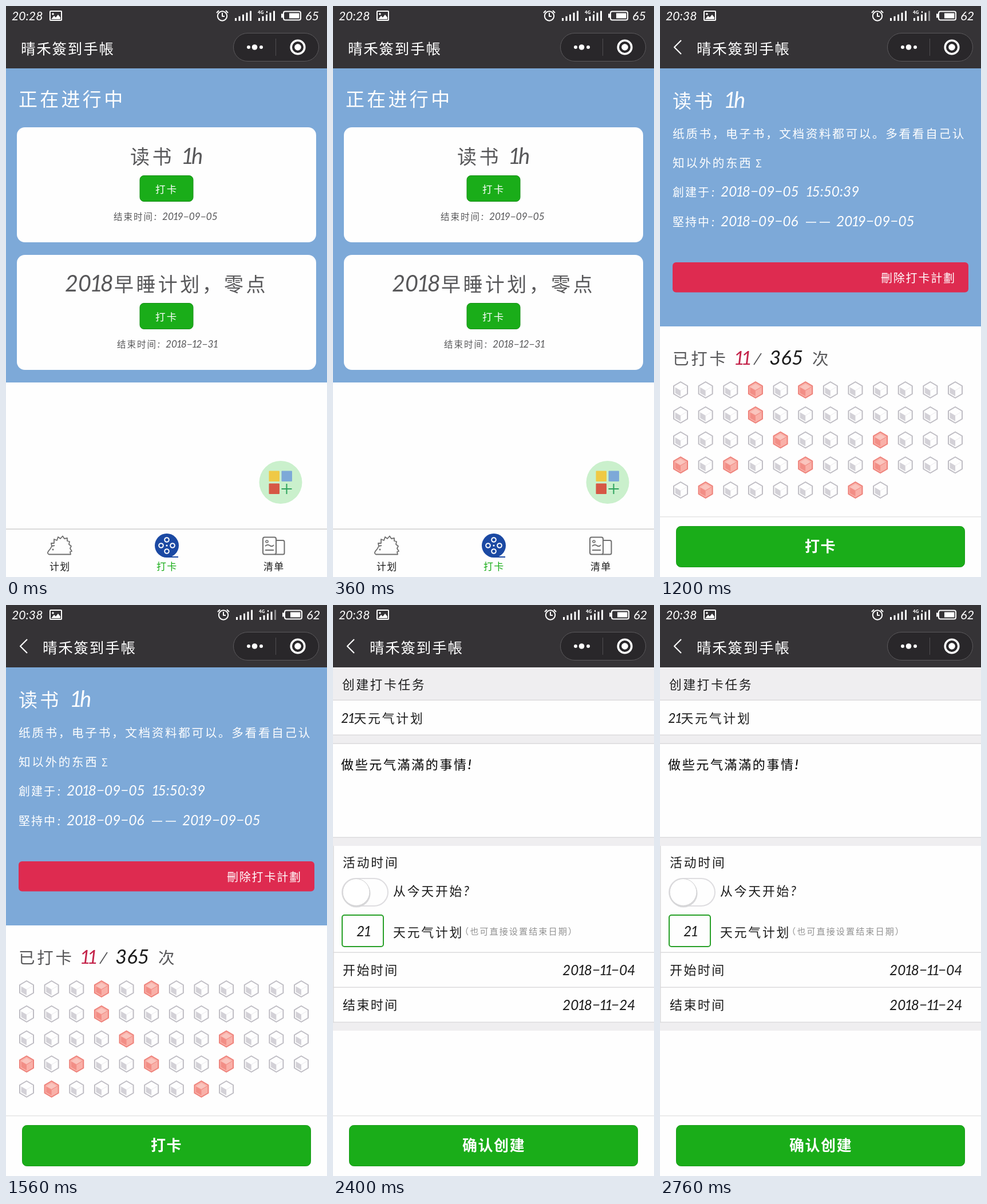
These frames come from a looping animation (561 px wide and 998 px high, 3000 ms). An HTML page:

```html
<!DOCTYPE html>
<html lang="zh">
<head>
<meta charset="utf-8">
<title>签到</title>
<style>
  html, body { margin: 0; width: 100%; height: 100%; overflow: hidden; background: #fefefe; }
  svg { display: block; position: absolute; left: 0; top: 0; }
  text { font-family: "Noto Sans CJK SC", "Noto Sans CJK", sans-serif; white-space: pre; }
  .latin { font-family: Lato, "Noto Sans", sans-serif; font-style: italic; letter-spacing: 0; }
</style>
</head>
<body>
<svg id="stage" width="561" height="998" viewBox="0 0 561 998"></svg>
<script>
const STEP = 600;
const C = {
  dark: '#353336', blue: '#7da9d8', yellow: '#efcd48', green: '#1aad19', pale: '#9dd99c',
  paleText: '#d6f0d5', red: '#de2b50', crimson: '#c4244a', gray: '#58585a', icon: '#6f6f6f',
  ink: '#1c1c1c', band: '#efeef0', rule: '#dcdbdd', white: '#fefefe'
};
const APP = '晴禾簽到手帳';

const rect = (x, y, w, h, fill, r = 0, stroke = 'none', sw = 1) =>
  `<rect x="${x}" y="${y}" width="${w}" height="${h}" rx="${r}" fill="${fill}" stroke="${stroke}" stroke-width="${sw}"/>`;
const circle = (x, y, r, fill, stroke = 'none', sw = 1) =>
  `<circle cx="${x}" cy="${y}" r="${r}" fill="${fill}" stroke="${stroke}" stroke-width="${sw}"/>`;
const path = (d, stroke, sw = 2, fill = 'none') =>
  `<path d="${d}" fill="${fill}" stroke="${stroke}" stroke-width="${sw}" stroke-linejoin="round"/>`;
const group = (x, y, body) => `<g transform="translate(${x} ${y})">${body}</g>`;
const rule = y => rect(0, y - .5, 561, 1.5, C.rule);

// Digits and Latin letters are slanted; the figure 1 is set narrow.
const latin = (run, size, weight) =>
  `<tspan class="latin" font-size="${size * 1.06}" font-weight="${Math.max(weight, 400)}">` +
  run.replace(/1/g, '<tspan dx="-.07em" letter-spacing="-.12em">1</tspan>') + '</tspan>';

function text(x, y, size, str, fill = C.white, weight = 300, gap = .13) {
  const body = str.replace(/-/g, '−').replace(/[!-~−]+/g, run => latin(run, size, weight));
  return `<text x="${x}" y="${y}" font-size="${size}" font-weight="${weight}" fill="${fill}" letter-spacing="${size * gap}">${body}</text>`;
}

// A plan title that opens with a larger number.
const numbered = (x, y, number, restX, rest, fill) =>
  text(x, y, 37.5, number, fill) + text(restX, y, 34, rest, fill);

function statusBar(time, level, shift, weak) {
  const bars = (x, dim) => [0, 1, 2, 3, 4].map(i => {
    const h = 5 + i * 3.1;
    return rect(x + i * 6.5, 26 - h, 3, h, dim && i === 4 ? '#8b8a8c' : '#fff');
  }).join('');
  const picX = time.endsWith('1') ? 70 : 76;
  const picture = rect(1, 1, 20, 16, 'none', 1, '#fff', 2) +
    path('M3 15 L8 9 L11 12 L15 7 L19 12 V15 Z', 'none', 0, '#fff') + circle(6, 6, 1.8, '#fff');
  const alarm = circle(378, 17.5, 8.2, 'none', '#fff', 2) +
    path('M378 12 V18 H382 M368 12 L372 8 M388 12 L384 8', '#fff', 2);
  const battery = rect(485, 9.5, 30, 15, 'none', 3, '#fff', 2) +
    rect(481, 13.5, 3, 7, '#fff') + rect(495, 12.5, 17.5, 9, '#fff');
  return text(10, 25, 20, time, '#fff', 400) + group(picX, 8, picture) +
    group(shift, 0, alarm + bars(400) + bars(441, weak) + battery +
      '<text x="440" y="14" font-size="8" font-weight="700" fill="#fff">4G</text>' +
      rect(455, 9, 2, 3, '#fff')) +
    text(523 + shift, 25, 20.5, level, '#fff', 400);
}

function header(time, level, { shift = 2, back = true, weak = true } = {}) {
  return rect(0, 0, 561, 109, C.dark) + statusBar(time, level, shift, weak) +
    (back ? path('M37 60 L25 72 L37 84', '#fff', 2.2) : '') +
    text(back ? 64 : 26, 84, 25.5, APP, '#fff', 400, .07) +
    rect(397.5, 47.5, 149, 49, '#29272a', 24.5, '#5b595c') +
    circle(424, 72, 3, '#fff') + circle(434.5, 72, 4.8, '#fff') + circle(446, 72, 3, '#fff') +
    rect(471, 57, 1, 30, '#504e51') +
    circle(510, 72, 11.8, 'none', '#fff', 3.6) + circle(510, 72, 5.8, '#fff');
}

function card(y, title, button, date) {
  return group(0, y, rect(19, 0, 523, 201, C.white, 14) + title + button + date);
}
const smallButton = rect(234, 84.5, 93, 45, C.green, 7, '#178f17') + text(261, 114.5, 17.5, '打卡', '#fff', 400);
const date = (x, label, day) =>
  text(x, 162, 15.5, label, C.gray) + text(x + 71, 162, 15.5, ':', C.gray) + text(x + 85, 162, 16.3, day, C.gray);

const running = rect(0, 109, 561, 549, C.blue) + text(22, 175, 33, '正在进行中') +
  card(212, text(217, 64, 34, '读书', C.gray) + text(309, 64, 36, '1h', C.gray), smallButton,
    date(188, '结束时间', '2019-09-05')) +
  card(435, numbered(103, 64, '2018', 189, '早睡计划，零点', C.gray), smallButton,
    date(194, '结束时间', '2018-12-31'));

const upcoming = rect(0, 566, 561, 326, C.yellow) + text(25, 631, 33, '即将开始的计划') +
  card(669, numbered(165, 64, '21', 206, '天元气计划', C.gray),
    rect(213.5, 84.5, 133, 44, C.pale, 6, '#84bd83') + text(242, 114, 17.8, '尚未开始', C.paleText),
    date(195, '开始时间', '2018-11-04'));

const addButton = circle(480, 832.5, 37.5, '#caf0cc') +
  rect(459.5, 812.5, 18.5, 18.5, '#efc945', 1) + rect(481.5, 812.5, 18.5, 18.5, C.blue, 1) +
  rect(459.5, 834.5, 18.5, 18.5, '#d65745', 1) + path('M490.5 835 V853 M481.5 844 H499.5', '#2da25c');

function tabBar() {
  const hedgehog = path('M75 958.5 Q71.5 957 74 953 Q78 949 80 944 L79 939 L84 939 L84 932 L89 934 L91 928 L95 931 ' +
    'L99 926.5 L102 931 L107 930 L107 935 L111 936 L110 941 L114 944 L112 948 L115 953 L112 954 L113 958.5 Z ' +
    'M80 944 L85 943', C.icon, 1.8) + circle(82, 950, 1.5, C.icon);
  const holes = [[0, -10], [10, 0], [0, 10], [-10, 0]]
    .map(([x, y]) => circle(281 + x, 943 + y, 3.8, 'none', '#fff', 2)).join('');
  const reel = circle(281, 943, 21, '#1b49a3') + path('M281 963 H301', '#1b49a3', 2) + holes + circle(281, 943, 1.6, '#fff');
  const notes = rect(449, 928.5, 23, 30, 'none', 3, C.icon, 2) +
    path('M472 934 H484 Q486.5 934 486.5 937 V956 Q486.5 958.5 484 958.5 H470 ' +
      'M453 944 Q457 940 461 943 T468 942 M453 951 H468', C.icon, 2) + circle(456, 936, 2, 'none', C.icon, 1.6);
  return rect(0, 914, 561, 84, C.white) + rect(0, 913.5, 561, 1.5, '#cfcfcf') + hedgehog + reel + notes +
    text(76, 985.5, 17, '计划', C.ink, 400, .07) + text(263, 985.5, 17, '打卡', C.green, 400, .07) +
    text(450, 985.5, 17, '清单', C.ink, 400, .07);
}

function footer(x, label, disabled) {
  return rect(0, 892, 561, 106, C.white) + rect(0, 892, 561, 1.5, '#e5e5e5') +
    rect(28.5, 909.5, 504, 71, disabled ? C.pale : C.green, 8, disabled ? '#84bd83' : '#189a18') +
    text(x, 954, 26, label, disabled ? C.paleText : '#fff', 700, .06);
}

// Label, start day and the remainder of a detail line.
const infoLine = (y, label, day, rest, restX) =>
  text(22, y, 20, label, '#fff', 300, .1) + text(90, y, 20, ':') +
  text(106, y, 23, day) + text(restX, y, 23, rest);
const span = (y, from, dashX, to, toX) =>
  infoLine(y, '堅持中', from, '', 0) + path(`M${dashX} ${y - 7} h18 m6 0 h18`, '#fff', 1.6) + text(toX, y, 23, to);
const deleteButton = y => rect(22, y, 517, 52.5, C.red, 6) + text(386, y + 35, 20, '刪除打卡計劃', '#fff', 400, .09);

function tally(y, done, slashX, total, totalX, endX) {
  return text(22, y, 28.5, '已打卡', C.gray) + text(131, y, 31.5, done, C.crimson) +
    path(`M${slashX} ${y} l13 -20`, C.gray, 1.8) +
    text(totalX, y, 33, total, C.ink) + text(endX, y, 28.5, '次', C.gray);
}

function cube(x, y, on) {
  const [edge, fill, side, top] = on
    ? ['#ee8079', '#f9b0a8', '#f28e86', '#fac5be'] : ['#bebcc3', '#fefefe', '#d3d1d7', '#fefefe'];
  return group(x, y, path('M0 -14 L12 -7 V7 L0 14 L-12 7 V-7 Z', edge, 2, fill) +
    path('M-9.5 -4.5 L0 1 V11 L-9.5 5.5 Z', 'none', 0, side) +
    path('M0 -10.5 L9 -5 L0 0 L-9 -5 Z', 'none', 0, top) +
    path('M0 1 L10 -5', on ? edge : '#e6e5e9', .8));
}
const checked = new Set([3, 5, 15, 28, 32, 36, 38, 41, 44, 49, 55]);
const cubes = Array.from({ length: 57 }, (_, i) =>
  cube(36 + i % 12 * 43.64, 671 + Math.floor(i / 12) * 43.75, checked.has(i))).join('');

const readingScreen = () => rect(0, 109, 561, 451, C.blue) +
  text(22, 178, 33, '读书') + text(114, 178, 36, '1h') +
  text(22, 231, 20.6, '纸质书，电子书，文档资料都可以。多看看自己认') +
  text(22, 282, 20.6, '知以外的东西') + text(167, 282, 18, 'Σ') +
  infoLine(333, '創建于', '2018-09-05', '15:50:39', 256) +
  span(385, '2018-09-06', 255, '2019-09-05', 308) +
  deleteButton(448) + tally(627, '11', 164, '365', 191, 266) + cubes +
  footer(253, '打卡') + header('20:38', '62');

const energyScreen = () => rect(0, 109, 561, 399, C.yellow) +
  numbered(22, 178, '21', 63, '天元气计划') + text(22, 231, 20.6, '做些元气滿滿的事情!') +
  infoLine(282, '創建于', '2018-11-01', '20:30:00', 236) +
  span(333, '2018-11-04', 244, '2018-11-24', 298) +
  deleteButton(396.5) + tally(576, '0', 162, '21', 190, 231) +
  text(22, 671, 28.5, '最长连续打卡', C.gray) + text(239, 671, 31.5, '0', C.crimson) + text(272, 671, 28.5, '天', C.gray) +
  text(22, 744, 28.5, '勋章', C.gray) + text(108, 744, 31.5, '0', C.crimson) + text(140, 744, 28.5, '枚', C.gray) +
  text(184, 743, 22.8, '连续打卡', '#8a8a8a') + text(299, 743, 24, '7', '#8a8a8a') + text(322, 743, 22.8, '天可得', '#8a8a8a') +
  text(22, 816, 28.5, '打卡详情', C.gray) +
  footer(227, '尚未开始', true) + header('20:31', '63');

function createScreen() {
  const row = (y, label, day) => text(17, y, 22, label, C.ink, 400, .11) + text(401, y + 1, 23, day, C.ink, 400);
  return rect(0, 109, 561, 57, C.band) + rect(0, 227, 561, 15, C.band) +
    rect(0, 406, 561, 15, C.band) + rect(0, 729, 561, 15, C.band) +
    [166, 227, 242, 406, 607, 668, 729].map(rule).join('') + rect(0, 421, 1.5, 308, C.rule) +
    text(16, 147, 21.6, '创建打卡任务', C.ink, 400) +
    text(14, 206, 21.8, '21天元气计划', C.ink, 400) +
    text(14, 287, 22, '做些元气滿滿的事情!', '#000', 500, .12) +
    text(17, 458, 21.8, '活动时间', C.ink, 400) +
    rect(16, 478, 80, 48, C.white, 24, '#dedde0', 2) +
    circle(41, 504, 24.5, '#d8d8da') + circle(40.5, 502, 23.5, '#fff', '#d0d0d2') +
    text(105, 508, 21.8, '从今天开始?', C.ink, 400) +
    rect(16, 542, 72, 55, C.white, 4, '#28a028', 2) + text(41, 579, 23, '21', C.ink, 400) +
    text(105, 580, 21.8, '天元气计划', C.ink, 400) +
    text(222, 576, 15.2, '（也可直接设置结束日期）', '#929292') +
    row(646, '开始时间', '2018-11-04') + row(707, '结束时间', '2018-11-24') +
    footer(226, '确认创建') + header('20:38', '62', { weak: false });
}

const screens = [
  running + addButton + tabBar() + header('20:28', '65', { shift: 0, back: false, weak: false }),
  group(0, -114, running) + upcoming + addButton + tabBar() + header('20:31', '63', { back: false }),
  readingScreen(), energyScreen(), createScreen()
];

const stage = document.getElementById('stage');
stage.innerHTML = screens.map(s => `<g>${rect(0, 0, 561, 998, C.white)}${s}</g>`).join('');

const loop = STEP * screens.length;
[...stage.children].forEach((el, i) => el.animate([
  { opacity: 1, easing: 'steps(1, end)' },
  { opacity: 0, offset: 1 / screens.length },
  { opacity: 0 }
], { duration: loop, delay: i * STEP - loop, iterations: Infinity }));
</script>
</body>
</html>
```
